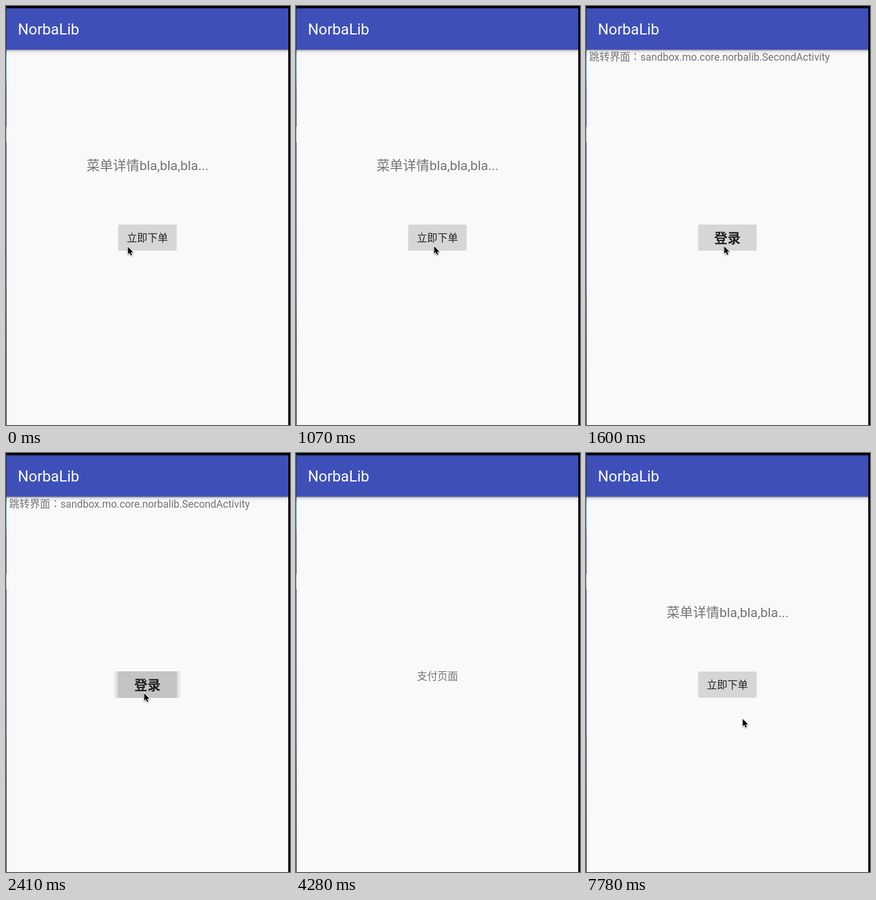
An HTML page that plays this animation: 490 by 720 pixels, repeating every 8 s.

```html
<!DOCTYPE html>
<html lang="zh-CN">
<head>
<meta charset="utf-8">
<title>Order flow</title>
<style>
  html, body { margin: 0; width: 100%; height: 100%; overflow: hidden; background: #000; }
  svg { display: block; width: 490px; height: 720px; }
  text { font-family: Roboto, "Noto Sans CJK SC", sans-serif; font-size: 17.7px; fill: #737373; white-space: pre; }
  .title { font-size: 26px; fill: #fff; }
  .large { font-size: 22.8px; }
  .label { fill: #212121; text-anchor: middle; }
  .bold { font-weight: 700; }
  .wide { font-family: "Noto Sans CJK TC", sans-serif; }
  #cursor { filter: drop-shadow(0 1px 1px rgba(0, 0, 0, .4)); }
</style>
</head>
<body>
<svg id="stage" viewBox="0 0 490 720"></svg>
<script>
const LOOP = 8000;
const CENTER = { x: 244, y: 351 };

const button = (label, cls, baseline) => `
  <rect class="face" x="193.5" y="375.5" width="101" height="45" rx="2" fill="#d5d7d6"/>
  <text class="label ${cls}" x="244" y="${baseline}">${label}</text>`;

const page = (id, content) => `
  <g id="${id}">
    <rect class="scrim" x="1" y="4" width="486" height="716" opacity=".305"/>
    <g class="screen">
      <rect x="1" y="4" width="486" height="716" fill="#f9f9f9"/>
      <rect x="1" y="75" width="486" height="9" fill="url(#shade)"/>
      <rect x="1" y="4" width="486" height="71" fill="#3e50b8"/>
      <text class="title" x="20.5" y="49">NorbaLib</text>
      ${content}
    </g>
  </g>`;

const stage = document.getElementById('stage');
stage.innerHTML = `
  <defs>
    <linearGradient id="shade" x2="0" y2="1">
      <stop stop-opacity=".42"/>
      <stop offset=".3" stop-opacity=".1"/>
      <stop offset=".65" stop-opacity=".025"/>
      <stop offset="1" stop-opacity=".01"/>
    </linearGradient>
    <linearGradient id="glow">
      <stop stop-opacity="0"/>
      <stop offset=".075" stop-opacity=".16"/>
      <stop offset=".925" stop-opacity=".16"/>
      <stop offset="1" stop-opacity="0"/>
    </linearGradient>
    <linearGradient id="edge" x2="0" y2="1">
      <stop stop-color="#1b3350"/>
      <stop offset=".1" stop-color="#23344f"/>
      <stop offset=".12" stop-color="#2fa5c6"/>
      <stop offset=".17" stop-color="#2fa5c6"/>
      <stop offset=".2" stop-color="#33568f"/>
      <stop offset=".65" stop-color="#274a85"/>
      <stop offset=".8" stop-color="#10213f"/>
      <stop offset="1" stop-color="#0b1830"/>
    </linearGradient>
  </defs>
  <rect width="490" height="720"/>
  <rect width="1" height="720" fill="url(#edge)"/>
  <rect y="208" width="1" height="26" fill="#c9a08c"/>
  ${page('menu', `
    <text class="large" x="139" y="281.5">菜单详情bla,bla,bla...</text>
    ${button('立即下单', '', 405.3)}`)}
  ${page('login', `
    <text x="5.5" y="94">跳转界面<tspan class="wide" lang="zh-TW">：</tspan>sandbox.mo.core.norbalib.SecondActivity</text>
    <rect id="halo" x="185" y="375" width="118" height="46" fill="url(#glow)"/>
    ${button('登录', 'large bold', 407)}`)}
  ${page('pay', `<text x="208.7" y="390">支付页面</text>`)}
  <path id="cursor" d="M1.5 1V13.6L4.3 11L6.3 15.6L8.4 14.7L6.4 10.2H10.4Z"
    stroke="#fff" stroke-width="1.6" paint-order="stroke"/>`;

const get = id => document.getElementById(id);
const cursor = get('cursor');
const halo = get('halo');
const loginFace = stage.querySelector('#login .face');

// Screen states: [start, page behind, page in front, scale, opacity, scrim]
const scenes = [
  [0, 'menu'],
  [1340, 'menu', 'login', .951, .75, true],
  [1600, 'login'],
  [2680, 'login', 'pay', .951, .75, true],
  [2940, 'pay'],
  [5090, 'menu', 'pay', .807, .035, false],
  [7780, 'menu']
];

// Pointer positions: [start, x, y]; no position means hidden
const pointer = [
  [0, 209, 413], [260, 238, 414], [530, 237, 412],
  [4020, 227, 590], [4280], [7780, 269, 456]
];

const at = (list, t) => list.filter(entry => entry[0] <= t).pop();
const show = (node, visible) => node.setAttribute('display', visible ? 'inline' : 'none');

function drawPage(id, visible, scale = 1, opacity = 1, scrim = false) {
  const group = get(id);
  const screen = group.querySelector('.screen');
  show(group, visible);
  show(group.querySelector('.scrim'), scrim);
  screen.setAttribute('opacity', opacity);
  screen.setAttribute('transform',
    `translate(${CENTER.x * (1 - scale)} ${CENTER.y * (1 - scale)}) scale(${scale})`);
}

function render(t) {
  const [, back, front, scale, opacity, scrim] = at(scenes, t);
  for (const id of ['menu', 'login', 'pay']) {
    if (id === front) drawPage(id, true, scale, opacity, scrim);
    else drawPage(id, id === back);
  }

  const pressed = t >= 2410 && t < 2680;
  show(halo, pressed);
  loginFace.setAttribute('fill', pressed ? '#c3c5c4' : '#d5d7d6');

  const [, x, y] = at(pointer, t);
  show(cursor, x !== undefined);
  if (x !== undefined) cursor.setAttribute('transform', `translate(${x} ${y})`);
}

const start = performance.now();
function tick() {
  render((performance.now() - start) % LOOP);
  requestAnimationFrame(tick);
}
tick();
</script>
</body>
</html>
```
